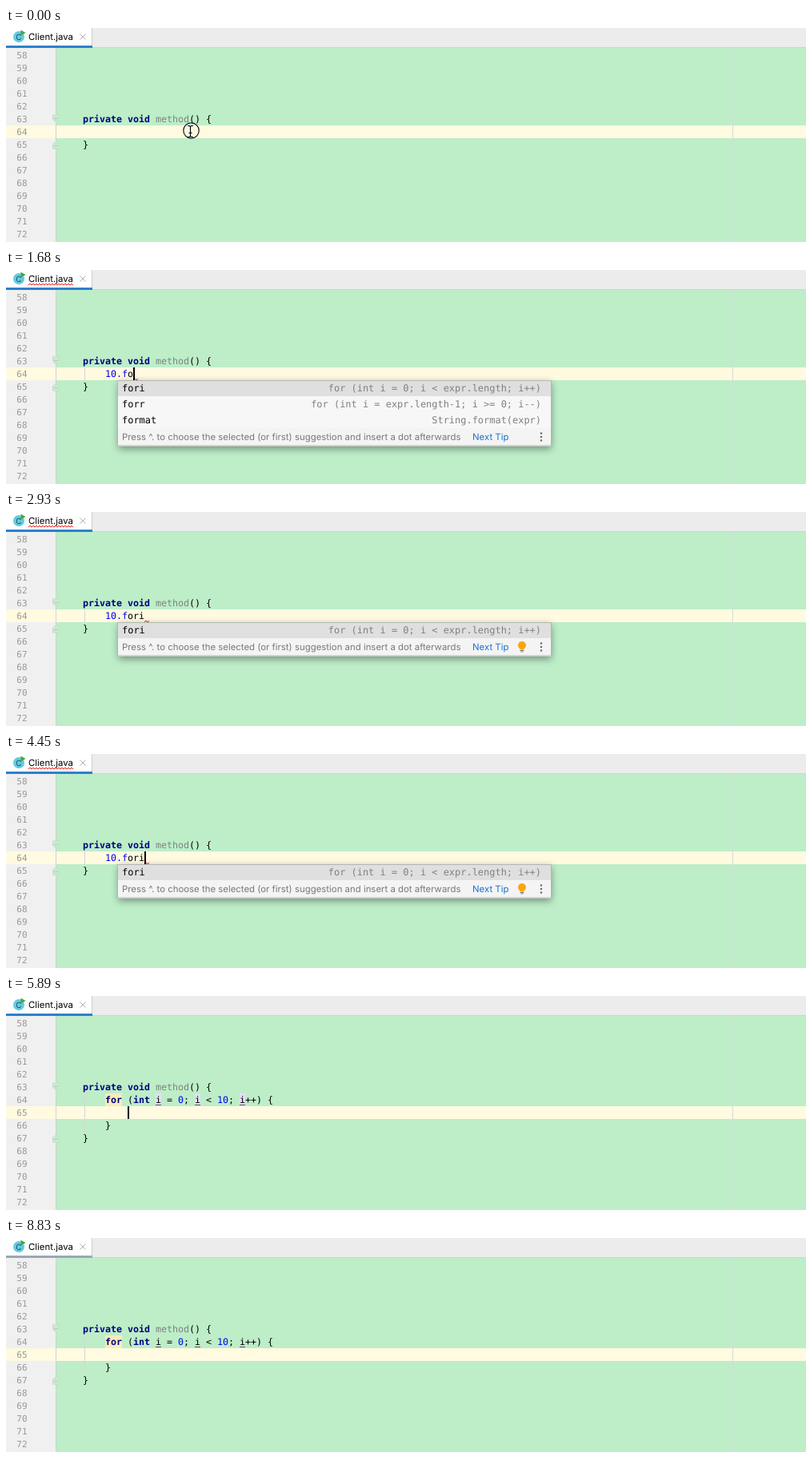
An HTML page with a canvas that plays this animation: 1000 px wide and 268 px high, repeating every 8930 ms.

```html
<!DOCTYPE html>
<html lang="en">
<head>
<meta charset="utf-8">
<title>Postfix completion</title>
<style>
html, body { margin: 0; width: 100%; height: 100%; overflow: hidden; background: #bdeec8; }
canvas { display: block; width: 1000px; height: 268px; }
</style>
</head>
<body>
<canvas id="stage"></canvas>
<script>
const LOOP = 8930, W = 1000, H = 268, ROW = 16, CHAR = 7;
const MONO = '"DejaVu Sans Mono", monospace';
const CODE = '11.63px ' + MONO, BOLD = 'bold ' + CODE;
const LIST = '11.96px ' + MONO, UI = '11.4px Inter, sans-serif';
const INK = '#000', KEY = '#000080', NUM = '#0000ff', GREY = '#808080', RED = '#e8201c';

const canvas = document.getElementById('stage');
const ctx = canvas.getContext('2d');
const scale = window.devicePixelRatio || 1;
canvas.width = W * scale;
canvas.height = H * scale;

// Each entry changes part of the state at its time in ms.
const timeline = [
  [0, { typed: '', caret: false, mouse: true, ring: true, line: 64, focus: true, popup: null }],
  [90, { ring: false }],
  [440, { caret: true }],
  [530, { typed: '1', mouse: false }],
  [710, { typed: '10' }],
  [880, { error: true, guide: true }],
  [1060, { tabError: true }],
  [1410, { typed: '10.' }],
  [1500, { typed: '10.f' }],
  [1590, { typed: '10.fo' }],
  [1680, { popup: 'fori forr format', hint: true }],
  [2210, { typed: '10.for', popup: 'fori forr', hint: false, error: false }],
  [2300, { typed: '10.fori' }],
  [2390, { popup: 'fori', hint: true, error: true }],
  [2840, { bulb: true }],
  [2930, { caret: false }],
  [3460, { caret: true }],
  [4000, { caret: false }],
  [4450, { caret: true }],
  [4720, { popup: null, loop: true, error: false }],
  [4810, { fields: true, selected: true }],
  [5080, { tabError: false }],
  [5170, { warning: true }],
  [5260, { underline: true }],
  [5890, { line: 65, selected: false }],
  [6160, { fields: false }],
  [6970, { caret: false }],
  [7410, { caret: true }],
  [7940, { caret: false }],
  [8480, { caret: true }],
  [8830, { caret: false, focus: false }]
];

const details = {
  fori: 'for (int i = 0; i < expr.length; i++)',
  forr: 'for (int i = expr.length-1; i >= 0; i--)',
  format: 'String.format(expr)'
};

function stateAt(time) {
  const state = {};
  for (const [start, change] of timeline) if (start <= time) Object.assign(state, change);
  return state;
}

const rowTop = line => 26 + (line - 58) * ROW;

function rect(x, y, w, h, color) {
  ctx.fillStyle = color;
  ctx.fillRect(x, y, w, h);
}

function text(str, x, y, font, color, align = 'left') {
  ctx.font = font;
  ctx.fillStyle = color;
  ctx.textAlign = align;
  ctx.fillText(str, x, y);
}

function path(points, color, width = 1, close = false) {
  ctx.beginPath();
  points.forEach(([x, y]) => ctx.lineTo(x, y));
  if (close) ctx.closePath();
  ctx.strokeStyle = color;
  ctx.lineWidth = width;
  ctx.stroke();
}

function dot(x, y, r, color) {
  ctx.beginPath();
  ctx.arc(x, y, r, 0, Math.PI * 2);
  ctx.fillStyle = color;
  ctx.fill();
}

function squiggle(x0, x1, y) {
  const points = [];
  for (let x = x0, up = 0; x <= x1; x += 2, up = 1 - up) points.push([x, y + 1 - up * 2]);
  path(points, RED);
}

// Parts are [text, color, bold] runs laid out one after another.
function code(line, x, parts) {
  for (const [str, color, bold] of parts) {
    text(str, x, rowTop(line) + 12, bold ? BOLD : CODE, color);
    x += str.length * CHAR;
  }
}

function foldMark(y, dir) {
  const points = [[58.5, y - 4 * dir], [66.5, y - 4 * dir], [66.5, y + 1.5 * dir],
    [62.5, y + 5 * dir], [58.5, y + 1.5 * dir]];
  path(points, '#b3d6ba', 1, true);
  ctx.fillStyle = '#c9e9cf';
  ctx.fill();
  path([[60.5, y + .5], [64.5, y + .5]], '#a9cbb0');
}

function drawTab(s) {
  rect(0, 0, W, 24, '#ececec');
  rect(0, 24, W, 1, '#d1d1d1');
  rect(0, 0, 107, 22, '#fff');
  rect(107, 0, 1, 24, '#cdcdcd');
  rect(0, 22, 108, 3, s.focus ? '#2d80cb' : '#9ba7b7');
  dot(16, 11, 7, '#62cbe4');
  text('C', 15.8, 14.7, '10px Inter, sans-serif', '#2b4a55', 'center');
  ctx.beginPath();
  ctx.moveTo(18.5, 2.5);
  ctx.lineTo(24.5, 6);
  ctx.lineTo(18.5, 9.5);
  ctx.fillStyle = '#45a83c';
  ctx.fill();
  text('Client.java', 28, 15, UI, INK);
  path([[92.5, 7.5], [99.5, 14.5]], '#b2b2b2');
  path([[99.5, 7.5], [92.5, 14.5]], '#b2b2b2');
  if (s.tabError) squiggle(28, 84, 18);
}

function drawEditor(s) {
  rect(0, 25, W, H, '#bdeec8');
  rect(0, 25, 62, H, '#f0f0f0');
  rect(0, rowTop(s.line), W, ROW, '#fffae0');
  rect(62, 25, 1, H, '#cfd3cf');
  rect(908, 25, 1, H, '#d4dcd5');
  for (let n = 58; n <= 72; n++) text(n, 26.5, rowTop(n) + 12, '11px ' + MONO, '#999', 'right');

  foldMark(113, 1);
  foldMark(s.loop ? 179 : 147, -1);
  if (s.guide) rect(98, 122, 1, s.loop ? 48 : 16, '#d3d9d0');

  code(63, 96, [['private void ', KEY, true], ['method', GREY], ['() {', INK]]);
  code(s.loop ? 67 : 65, 96, [['}', INK]]);
}

function drawTyped(s) {
  // A trailing "f" turns the number into a float literal.
  code(64, 124, [[s.typed.slice(0, 4), NUM], [s.typed.slice(4), INK]]);
  const x = 124 + s.typed.length * CHAR;
  if (s.error) squiggle(x, x + 6, 137);
  return x;
}

function drawLoop(s) {
  const vars = [187, 236, 292];
  if (s.warning) rect(124, 122, 21, 16, '#faebbb');
  if (s.fields) vars.forEach(x => rect(x, 122, CHAR, 16, '#e2e0f2'));
  if (s.selected) {
    rect(187, 122, 8, 16, '#3f6fa9');
    rect(187, 122, 8, 1, RED);
  }
  code(64, 124, [
    ['for', KEY, true], [' (', INK], ['int', KEY, true], [' ', INK],
    ['i', s.selected ? '#fff' : INK], [' = ', INK], ['0', NUM],
    ['; i < ', INK], ['10', NUM], ['; i++) {', INK]
  ]);
  code(66, 124, [['}', INK]]);
  if (s.underline) vars.forEach((x, k) => rect(x, 136, CHAR, 1, s.selected && !k ? '#fff' : '#555'));
  return s.line === 65 ? 152 : 194;
}

function drawBulb(x, y) {
  dot(x, y - 1.5, 5, '#f9a711');
  rect(x - 2.5, y + 2, 5, 2, '#f9a711');
  rect(x - 2.5, y + 4.5, 5, 1, '#777');
  rect(x - 1.5, y + 6, 3, 1, '#777');
}

function drawPopup(s) {
  const names = s.popup.split(' ');
  const x = 139.5, y = 138, w = 542;
  const h = 2 + 20 * (names.length + (s.hint ? 1 : 0)) + .5;
  ctx.save();
  ctx.shadowColor = 'rgba(0,0,0,.4)';
  ctx.shadowBlur = 9 * scale;
  ctx.shadowOffsetY = 3 * scale;
  rect(x, y, w, h, '#f7f7f7');
  ctx.restore();
  rect(x, y, w, 20, '#dfdfdf');
  names.forEach((name, k) => {
    text(name, 145, 152 + k * 20, LIST, INK);
    text(details[name], 669, 152 + k * 20, LIST, GREY, 'right');
  });
  if (s.hint) {
    const top = y + names.length * 20;
    rect(x, top, w, h - names.length * 20, '#f4f4f4');
    text('Press ^. to choose the selected (or first) suggestion and insert a dot afterwards',
      145, top + 15, UI, '#787878');
    text('Next Tip', 583, top + 15, UI, '#1a70cf');
    if (s.bulb) drawBulb(645, top + 10.5);
    for (const dy of [6.5, 11, 15.5]) dot(669, top + dy, 1.3, '#6e6e6e');
  }
  ctx.strokeStyle = '#b3b8b3';
  ctx.lineWidth = 1;
  ctx.strokeRect(x, y + .5, w, h - 1);
}

function drawMouse(ring) {
  const beam = (color, width) => {
    path([[227, 122.5], [229.5, 122.5], [230.5, 124], [230.5, 135], [229.5, 136.5], [227, 136.5]], color, width);
    path([[234, 122.5], [231.5, 122.5], [230.5, 124], [230.5, 135], [231.5, 136.5], [234, 136.5]], color, width);
    path([[228.5, 131.5], [232.5, 131.5]], color, width);
  };
  beam('rgba(255,255,255,.8)', 2.5);
  beam(INK, 1.1);
  if (!ring) return;
  ctx.beginPath();
  ctx.arc(231.5, 128.5, 9.7, 0, Math.PI * 2);
  ctx.strokeStyle = INK;
  ctx.lineWidth = 1.1;
  ctx.stroke();
}

function draw(time) {
  const s = stateAt(time);
  ctx.setTransform(scale, 0, 0, scale, 0, 0);
  ctx.textBaseline = 'alphabetic';
  ctx.textRendering = 'geometricPrecision';
  drawEditor(s);
  drawTab(s);
  const caretX = s.loop ? drawLoop(s) : drawTyped(s);
  if (s.caret) rect(caretX, rowTop(s.line), 2, ROW, INK);
  if (s.popup) drawPopup(s);
  if (s.mouse) drawMouse(s.ring);
}

const begin = performance.now();
function tick() {
  draw((performance.now() - begin) % LOOP);
  requestAnimationFrame(tick);
}
tick();
</script>
</body>
</html>
```
